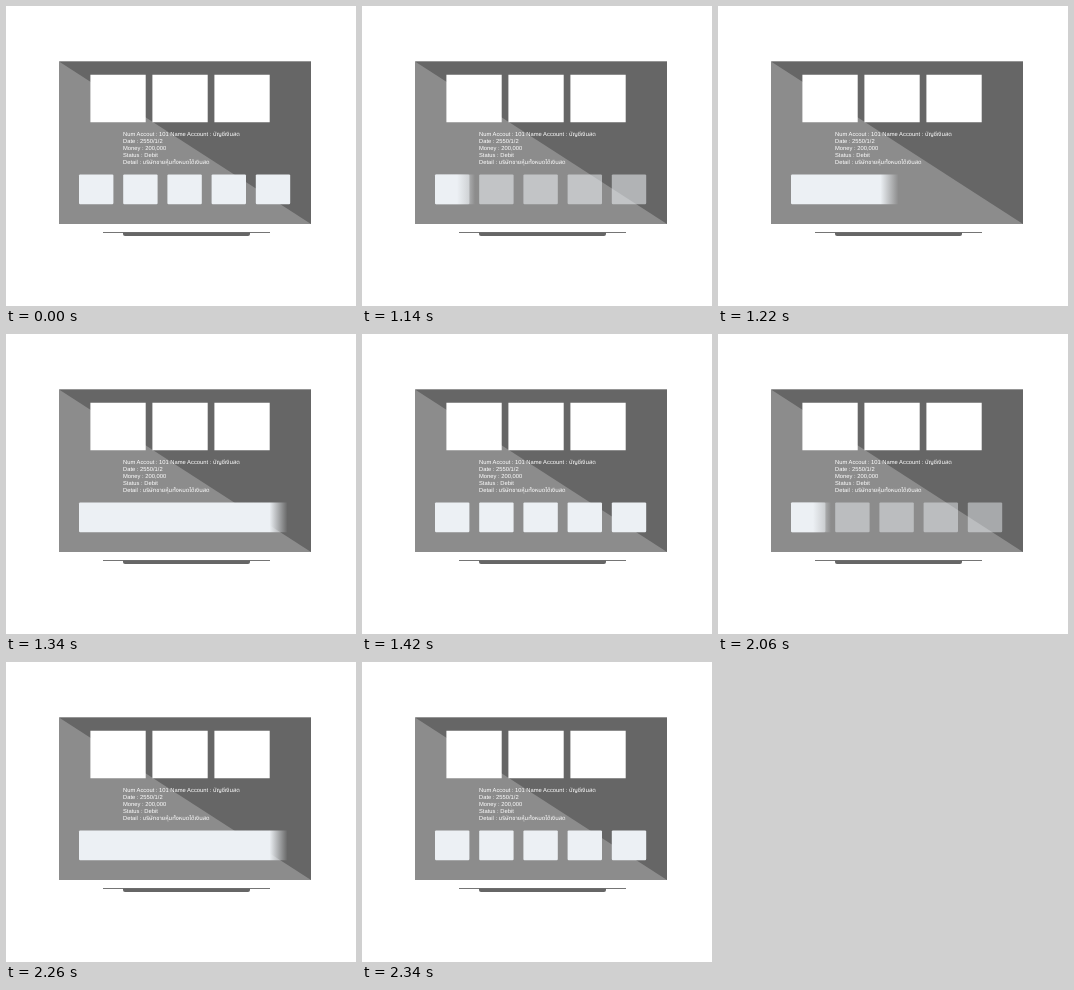
Recreate the animation shown at these times as an HTML page. Size 350 by 300 pixels, loop 2620 ms.

```html
<!DOCTYPE html>
<html lang="en">
<head>
<meta charset="utf-8">
<title>Account screen</title>
<style>
  html, body { margin: 0; width: 100%; height: 100%; overflow: hidden; background: #fff; }
  svg { display: block; width: 350px; height: 300px; }
  text { font: 5.8px "Liberation Sans", Arial, "Noto Sans Thai", "Noto Sans", sans-serif; fill: #fff; text-rendering: geometricPrecision; }
</style>
</head>
<body>
<svg viewBox="0 0 350 300">
  <defs>
    <linearGradient id="fade" gradientUnits="userSpaceOnUse" x1="0" x2="1">
      <stop offset="0" stop-color="#ecf0f4"/>
      <stop offset="1" stop-color="#ecf0f4" stop-opacity="0"/>
    </linearGradient>
  </defs>
  <path d="M53 55.6H305V218H53z" fill="#8c8c8c"/>
  <path d="M53 55.6H305V218z" fill="#666"/>
  <path d="M84.4 68.7h55.3v47.6h-55.3zM146.4 68.7h55.3v47.6h-55.3zM208.4 68.7h55.3v47.6h-55.3z" fill="#fff"/>
  <path d="M97 226.5H264" stroke="#666" stroke-width=".9"/>
  <path d="M117 226.5H244V228Q244 230 242 230H119Q117 230 117 228z" fill="#666"/>
  <text x="117" y="130.2">Num Accout : 101 Name Account : บัญชีเงินสด</text>
  <text x="117" y="137.2">Date : 2550/1/2</text>
  <text x="117" y="144.2">Money : 200,000</text>
  <text x="117" y="151.2">Status : Debit</text>
  <text x="117" y="158.2">Detail : บริษัทขายหุ้นทั้งหมดได้เงินสด</text>
  <g id="tiles" fill="#ecf0f4"></g>
  <rect id="bar" x="73" y="168.4" width="211.2" height="29.8" rx="1.2" fill="url(#fade)"/>
</svg>
<script>
  const LOOP = 2620, STEP = 40, WIPE = 280, FEATHER = 18;
  const WIPES = [{ start: 1140, alpha: 0.56 }, { start: 2060, alpha: 0.49 }];
  const [tiles, bar, fade] = ['tiles', 'bar', 'fade'].map(id => document.getElementById(id));

  tiles.innerHTML = [0, 1, 2, 3, 4].map(i =>
    `<rect x="${73 + i * 44.2}" y="168.4" width="34.4" height="29.8" rx="1.2"/>`).join('');

  function draw(now) {
    const t = now % LOOP;
    const wipe = WIPES.find(w => t >= w.start && t < w.start + WIPE);
    bar.style.display = wipe ? '' : 'none';
    if (wipe) {
      // The bar sweeps right in discrete steps while the tiles fade out.
      const step = Math.floor((t - wipe.start) / STEP);
      const edge = 113 + step * 33.7;
      fade.setAttribute('x1', edge - FEATHER);
      fade.setAttribute('x2', edge);
      tiles.setAttribute('opacity', Math.max(0, wipe.alpha - step * 0.42));
    } else {
      tiles.setAttribute('opacity', 1);
    }
  }

  const origin = performance.now();
  function tick() {
    draw(performance.now() - origin);
    requestAnimationFrame(tick);
  }
  tick();
</script>
</body>
</html>
```
